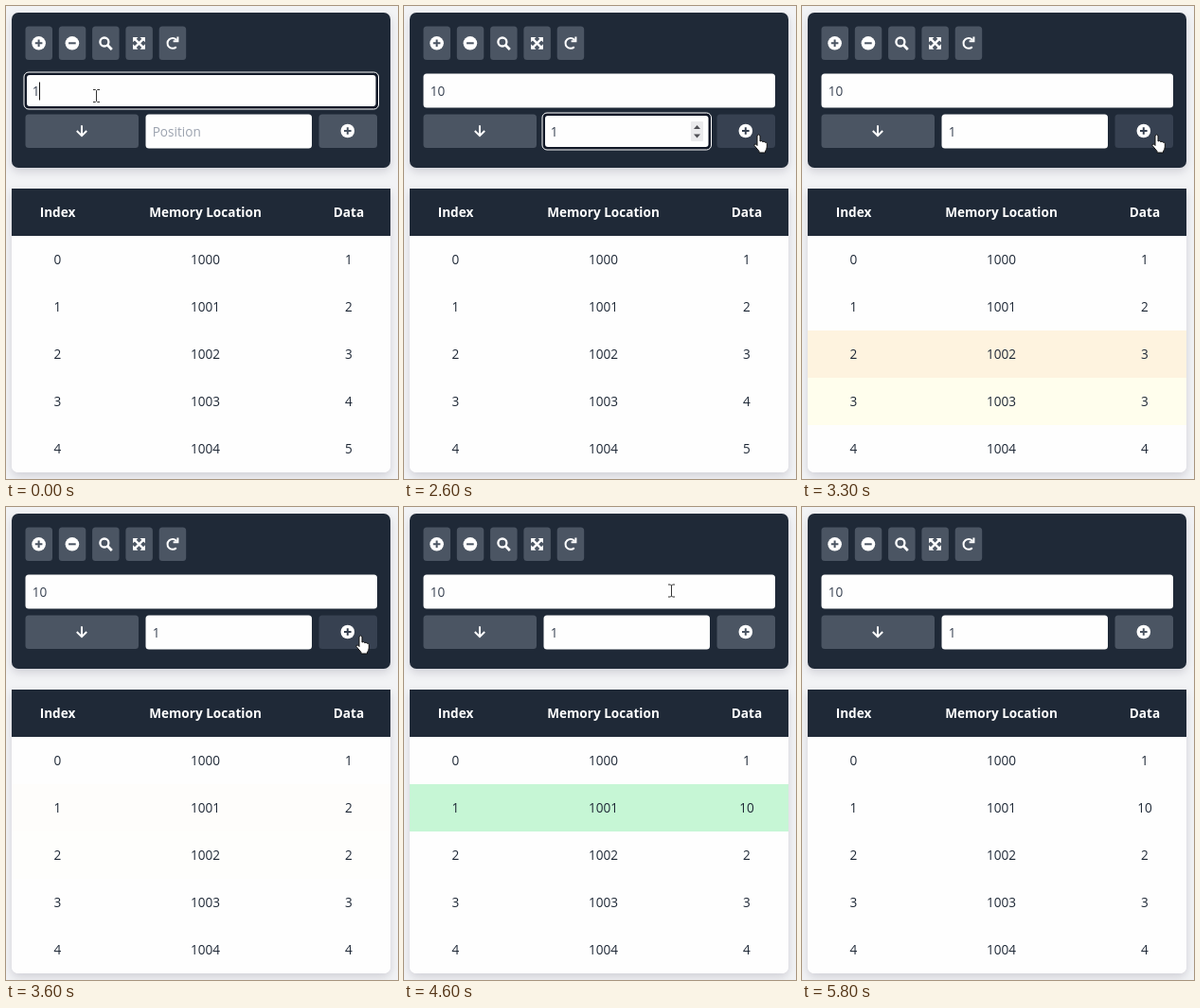
These frames come from a looping animation (414x500 px, 5900 ms). An HTML page:

```html
<!DOCTYPE html>
<html lang="en">
<head>
<meta charset="utf-8">
<title>Array insertion</title>
<style>
html, body { margin: 0; width: 100%; height: 100%; overflow: hidden; background: #f2f3f5; }
svg { display: block; width: 414px; height: 500px; font: 13.6px "Open Sans", "Noto Sans", sans-serif; fill: #1f2937; }
.dark { fill: #1f2937; }
.btn { fill: #4b5563; }
.field { fill: #fefefe; }
.head { fill: #fff; font-weight: 700; }
.mid { text-anchor: middle; }
.line { fill: none; stroke: #fff; stroke-width: 2; }
.cut { fill: none; stroke: #4b5563; stroke-width: 2; }
.shadow { filter: drop-shadow(0 4px 5px rgba(40, 30, 60, .16)); }
</style>
</head>
<body>
<svg id="stage" viewBox="0 0 414 500"></svg>
<script>
const LOOP = 5900;
const CLICK = 2790;
const ROW_TOP = 243, ROW_H = 50;
const ORANGE = '#fcd492', YELLOW = '#fefbc0', GREEN = '#c6f6d5';

// Each step clears the old highlights, then fades in its own rows.
const STEPS = [
  { at: CLICK, data: [1, 2, 3, 4, 4], marks: { 3: ORANGE, 4: YELLOW } },
  { at: 3200, data: [1, 2, 3, 3, 4], marks: { 2: ORANGE, 3: YELLOW } },
  { at: 3570, data: [1, 2, 2, 3, 4], marks: { 1: ORANGE, 2: YELLOW } },
  { at: 4270, data: [1, 10, 2, 3, 4], marks: { 1: GREEN }, out: 5000 }
];
const START = { at: 0, data: [1, 2, 3, 4, 5], marks: {} };

// Pointer stops: time, x, y
const PATH = [
  [0, 95.5, 95], [550, 95.5, 95], [800, 226.5, 139.5], [1850, 226.5, 139.5],
  [2100, 372, 137], [2250, 372, 137], [2600, 374.5, 136], [4280, 374.5, 136],
  [4600, 282.5, 88.5], [4750, 190, 32]
];
const POINTER_END = 4750;

const rect = (x, y, w, h, r, attrs) =>
  `<rect x="${x}" y="${y}" width="${w}" height="${h}" rx="${r}" ${attrs}/>`;
const text = (x, y, s, attrs = '') => `<text x="${x}" y="${y}" ${attrs}>${s}</text>`;
const icon = (x, y, body) => `<g transform="translate(${x} ${y})">${body}</g>`;
const disc = (d, id = '') => `<circle r="7.3" fill="#fff"/><path ${id} class="cut" d="${d}"/>`;

const PLUS = 'M-3.8 0H3.8M0-3.8V3.8';
const ICONS = [
  disc(PLUS),
  disc('M-3.8 0H3.8'),
  '<circle class="line" cx="-1.3" cy="-1.3" r="4.5" style="stroke-width:2.3"/>' +
    '<path class="line" d="M2 2L6.6 6.6" style="stroke-width:2.8"/>',
  '<path class="line" d="M-4.5-4.5L4.5 4.5M4.5-4.5L-4.5 4.5" style="stroke-width:2.4"/>' +
    '<path fill="#fff" d="M-6.4-6.4h5.4l-5.4 5.4zM6.4-6.4v5.4l-5.4-5.4zM6.4 6.4h-5.4l5.4-5.4zM-6.4 6.4v-5.4l5.4 5.4z"/>',
  '<path class="line" d="M4.4-3.2A5.4 5.4 0 1 0 4 3.9"/>' +
    '<path class="line" d="M5.6-6.8V-2H.8"/>'
];

function field(id, x, y, w) {
  const ring = rect(x - 1.5, y - 1.5, w + 3, 39, 5, 'fill="#111827" stroke="#fff"') +
    rect(x + 1.5, y + 1.5, w - 3, 33, 3, 'class="field"');
  return rect(x, y, w, 36, 3.5, 'class="field"') + `<g id="${id}Ring">${ring}</g>` +
    text(x + 7.2, y + 23.4, '', `id="${id}Text" fill="#374151"`) +
    `<path id="${id}Caret" stroke="#111" d="M0 ${y + 9}v19"/>`;
}

const COLS = [54.5, 210.5, 362];
const rowsMarkup = START.data.map((_, i) => {
  const y = ROW_TOP + i * ROW_H, base = y + 30;
  return rect(6, y, 400, ROW_H, 0, `id="row${i}"`) +
    text(COLS[0], base, i, 'class="mid"') + text(COLS[1], base, 1000 + i, 'class="mid"') +
    text(COLS[2], base, '', `class="mid" id="data${i}"`);
}).join('');

document.getElementById('stage').innerHTML =
  '<clipPath id="card"><path d="M6 193H406V486a7 7 0 0 1-7 7H13a7 7 0 0 1-7-7z"/></clipPath>' +
  rect(6, 7, 400, 164, 7, 'class="dark shadow"') +
  ICONS.map((body, i) => rect(20.5 + i * 35.3, 21.5, 28.5, 35.5, 3.5, 'class="btn"') +
    icon(34.6 + i * 35.3, 39.3, body)).join('') +
  field('value', 20.5, 71.5, 371.5) +
  rect(20.5, 114.5, 119.5, 35.5, 3.5, 'class="btn"') +
  '<path class="line" d="M80 126.3V137M74.8 132L80 137.2L85.2 132"/>' +
  field('pos', 147.5, 114.5, 175.5) +
  '<g id="spinner">' + rect(303, 122, 13, 21, 1, 'fill="#ebebed"') +
    '<path fill="#505055" d="M306 130h7l-3.5-4zM306 135.500h7l-3.500 4z"/></g>' +
  rect(330.5, 114.5, 61.5, 35.5, 3.5, 'id="insert" class="btn"') +
  icon(360.8, 132, disc(PLUS, 'id="insertPlus"')) +
  '<path class="shadow" fill="#fefefe" d="M6 193H406V486a7 7 0 0 1-7 7H13a7 7 0 0 1-7-7z"/>' +
  `<g clip-path="url(#card)">${rect(6, 193, 400, 50, 0, 'class="dark"')}${rowsMarkup}</g>` +
  ['Index', 'Memory Location', 'Data'].map((s, i) => text(COLS[i], 223, s, 'class="head mid"')).join('') +
  `<g id="pointer">
    <path id="beam" fill="none" stroke="#333" d="M-3.5-6.5H-1L0-5.500 1-6.500H3.500M0-5.500V5.500M-3.500 6.500H-1L0 5.500 1 6.500H3.500"/>
    <path id="hand" fill="#fff" stroke="#111" d="M-1.500 1Q0-1 1.500 1V7Q3 5.800 4.300 7.500Q5.800 6.500 6.900 8.200Q8.500 7.800 8.800 9.500V13Q8.500 16 7 17.500V19H.5V17.500Q-2 14.500-4.500 11.500Q-4.900 9.800-3 10L-1.500 11.500Z"/>
    <path id="arrow" fill="#fff" stroke="#111" d="M0 0V15L3.500 11.800 6 17 8.200 16 5.800 11H10.500Z"/>
  </g>`;

const el = {};
document.querySelectorAll('[id]').forEach(n => el[n.id] = n);
const show = (id, on) => el[id].setAttribute('visibility', on ? 'visible' : 'hidden');
const ease = u => { u = Math.min(1, Math.max(0, u)); return u * u * (3 - 2 * u); };
const inside = ([x, y], l, t, r, b) => x >= l && x <= r && y >= t && y <= b;

function pointerAt(t) {
  const i = PATH.findIndex(p => p[0] > t);
  if (i < 0) return PATH[PATH.length - 1].slice(1);
  const [t0, x0, y0] = PATH[i - 1], [t1, x1, y1] = PATH[i];
  const u = (t - t0) / (t1 - t0);
  return [x0 + (x1 - x0) * u, y0 + (y1 - y0) * u];
}

function drawField(id, value, hint, focused, caretOn) {
  el[id + 'Text'].textContent = value || hint;
  el[id + 'Text'].setAttribute('fill', value ? '#374151' : '#9ca3af');
  show(id + 'Ring', focused);
  show(id + 'Caret', focused && caretOn);
  const x = +el[id + 'Text'].getAttribute('x') + value.length * 7.8;
  el[id + 'Caret'].setAttribute('transform', `translate(${Math.floor(x) + .5} 0)`);
}

function draw(t) {
  const focus = t < 800 ? 'value' : t < CLICK ? 'pos' : '';
  const typed = t >= 1650;
  drawField('value', t < 100 ? '1' : '10', '', focus === 'value', t < 600);
  drawField('pos', typed ? '1' : '', 'Position', focus === 'pos',
    t < 1200 || (typed && t < 2150) || t > 2650);

  const p = pointerAt(t), visible = t < POINTER_END;
  const overPos = inside(p, 147, 114, 323, 150);
  const overInput = overPos || inside(p, 20, 71, 392, 107);
  const overInsert = inside(p, 330, 114, 392, 150);
  const overButton = overInsert || inside(p, 20, 114, 140, 150);
  el.pointer.setAttribute('transform', `translate(${p})`);
  show('beam', visible && overInput);
  show('hand', visible && overButton);
  show('arrow', visible && !overInput && !overButton);
  show('spinner', focus === 'pos' || (visible && overPos));
  const shade = visible && overInsert ? '#374151' : '#4b5563';
  el.insert.style.fill = shade;
  el.insertPlus.style.stroke = shade;

  const step = STEPS.filter(s => s.at <= t).pop() || START;
  let level = ease((t - step.at) / 280);
  if (step.out) level *= 1 - ease((t - step.out) / 450);
  step.data.forEach((v, i) => {
    el['data' + i].textContent = v;
    el['row' + i].setAttribute('fill', step.marks[i] || '#fefefe');
    el['row' + i].setAttribute('fill-opacity', step.marks[i] ? level : 1);
  });
}

const begin = performance.now();
function tick() {
  const t = (performance.now() - begin) % LOOP;
  draw(Math.floor(t / 100) * 100);
  requestAnimationFrame(tick);
}
tick();
</script>
</body>
</html>
```
